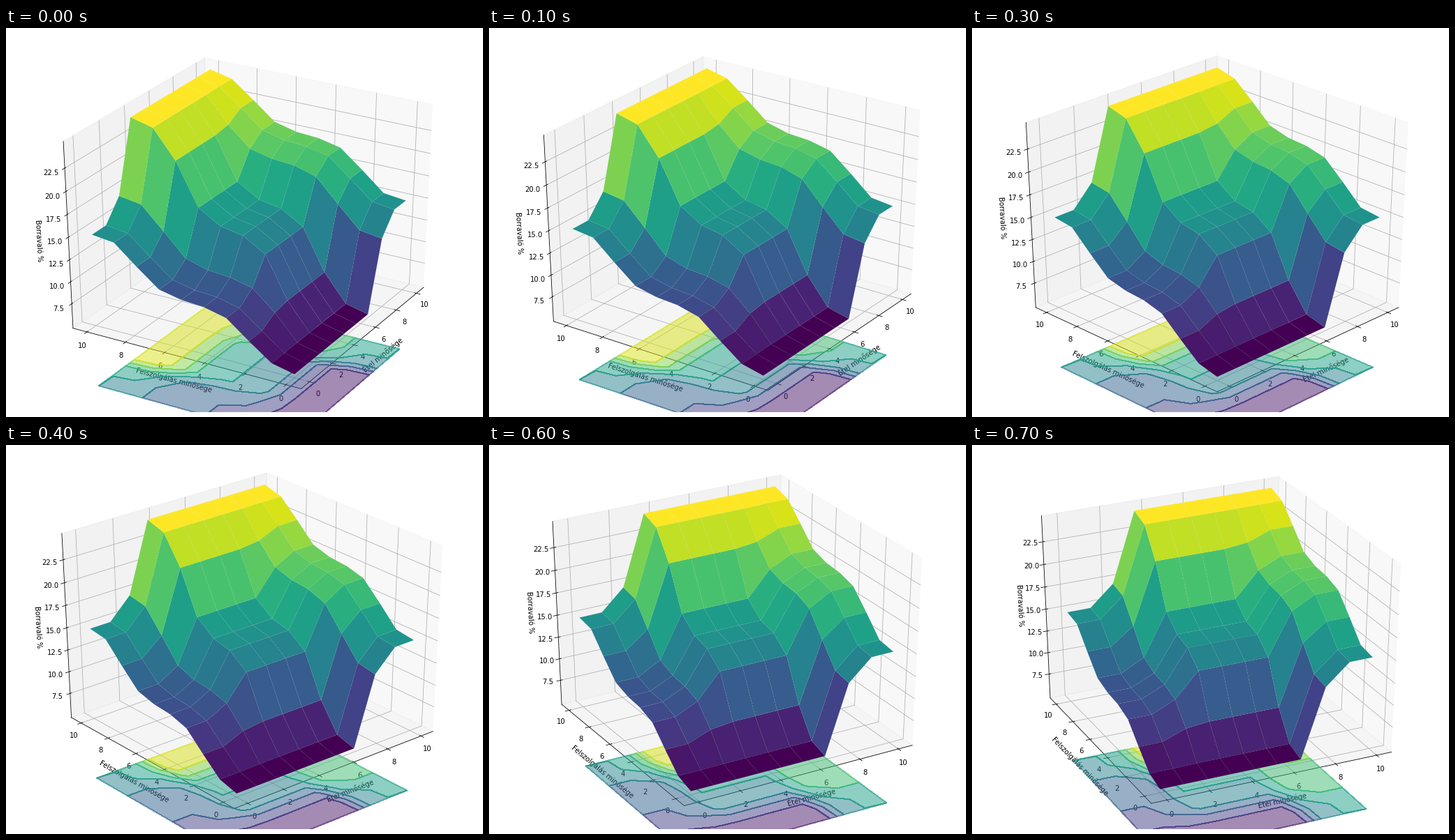
These frames come from a looping animation (683x558 px, 2700 ms). A matplotlib script:

```python
import numpy as np
import matplotlib.pyplot as plt
from matplotlib.animation import FuncAnimation

W, H, DPI = 683, 558, 72


def gauss(v, centre, sigma=1.5):
    return np.exp(-((v - centre) ** 2) / (2 * sigma ** 2))


def weight(h):
    """Area of a unit triangle clipped at height h."""
    return 2 * h - h ** 2


def tip(food, service):
    """Mamdani controller with three equal output triangles at 5, 15, 25."""
    rancid = np.clip((3 - food) / 2, 0, 1)
    delicious = np.clip((food - 7) / 2, 0, 1)
    low = weight(np.maximum(gauss(service, 0), rancid))
    mid = weight(gauss(service, 5))
    high = weight(np.maximum(gauss(service, 10), delicious))
    return (5 * low + 15 * mid + 25 * high) / (low + mid + high)


def padded(lo, hi):
    pad = (hi - lo) / 48
    return lo - pad, hi + pad


axis = np.linspace(0, 10, 10)
X, Y = np.meshgrid(axis, axis)
Z = tip(X, Y)

fig = plt.figure(figsize=(W / DPI, H / DPI), dpi=DPI, facecolor="white")
ax = fig.add_axes([7.2 / W, 7.2 / H, 669.6 / W, 543.6 / H],
                  projection="3d", computed_zorder=False)
# Fill the whole rectangle instead of a centred square.
ax.apply_aspect = lambda position=None: None
ax.set_box_aspect((1, 1, 1), zoom=3 ** 0.5 / 1.8294640721620434)

floor = ax.contourf(X, Y, Z, zdir="z", offset=-2.5, cmap="viridis", alpha=0.5)
floor.set_edgecolor("face")
floor.set_linewidth(1)
floor.set_zorder(1)
ax.plot_surface(X, Y, Z, rstride=1, cstride=1, cmap="viridis",
                linewidth=0.4, antialiased=True, zorder=2)

ax.set_xticks(range(0, 11, 2))
ax.set_yticks(range(0, 11, 2))
ax.set_zticks(np.arange(7.5, 23, 2.5))
ax.set_xlim(*padded(-0.5, 10.5))
ax.set_ylim(*padded(-0.5, 10.5))
ax.set_zlim(*padded(Z.min(), Z.max()))
ax.set_xlabel("Étel minősége")
ax.set_ylabel("Felszolgálás minősége")
ax.set_zlabel("Borravaló %")


def update(i):
    # Turn by 5 degrees per step, then hold the last view.
    ax.view_init(elev=30, azim=210 + 5 * min(i, 7))
    return []


anim = FuncAnimation(fig, update, frames=27, interval=100,
                     repeat=True, repeat_delay=0, blit=False)
plt.show()
```
